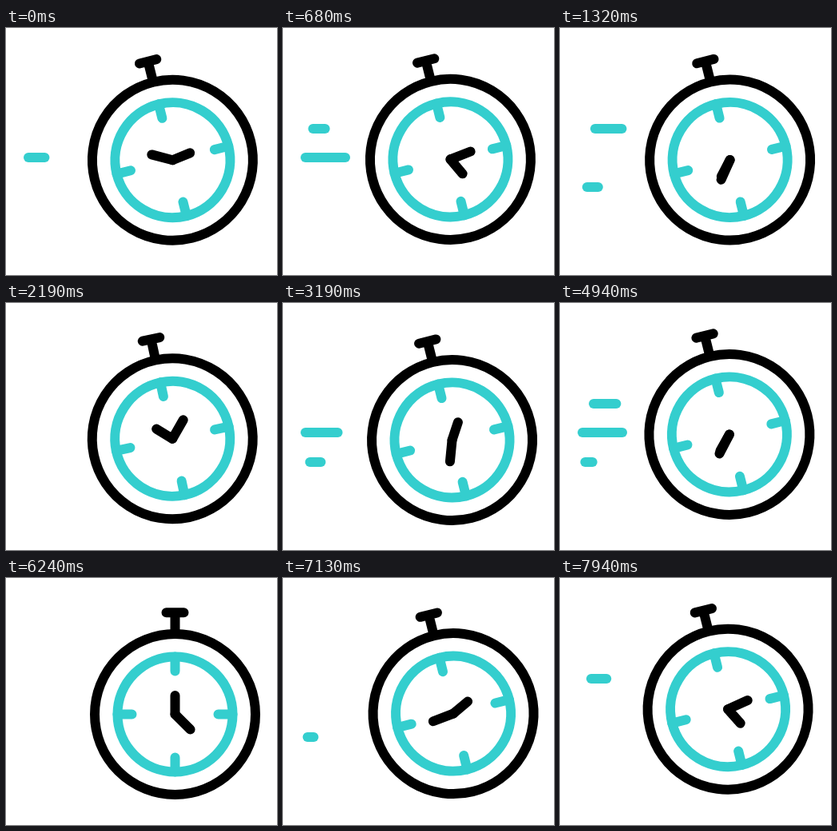
These frames come from a looping animation (339 by 309 pixels, 8 s). An HTML page:

```html
<!DOCTYPE html>
<html lang="en">
<head>
<meta charset="utf-8">
<title>Stopwatch</title>
<style>
  html, body { margin: 0; width: 100%; height: 100%; overflow: hidden; background: #fff; }
  svg { display: block; width: 100vw; height: 100vh; }
  svg * { fill: none; stroke-width: 12; stroke-linecap: round; stroke-linejoin: round; }
  .ink { stroke: #000; }
  .teal { stroke: #34cece; }
</style>
</head>
<body>
<svg viewBox="0 0 339 309">
  <g id="streaks"></g>
  <g id="watch">
    <path class="ink" d="M0-101V-127M-11-127.2H11"/>
    <circle class="ink" r="100.5"/>
    <circle class="teal" r="72"/>
    <path class="teal" d="M0-72V-54M0 72V54M-72 0H-54M72 0H54"/>
    <path class="ink" id="minute" d="M0 0V-23.5"/>
    <path class="ink" id="hour" d="M0 0V-27"/>
  </g>
</svg>
<script>
const LOOP = 8000, SPIN = 3300, LEAN = -14, WINDUP = 30;
const RUNS = [{ from: -772, pace: 0.97 }, { from: 2895, pace: 1 }, { from: 6544, pace: 1 }];

// Burst n of a row starts to fade at first + gap * n + drift * n * n.
const ROWS = [
  { y: 126, reach: 38, end: 22, lead: 50, grow: 50, first: 1015, gap: 338, drift: 0 },
  { y: 162, reach: 22, end: 22, lead: 27, grow: 12, first: 275, gap: 422, drift: -13 },
  { y: 199, reach: 38, end: 17, lead: 50, grow: 50, first: 228, gap: 252, drift: 19 }
];
const LEFT = 22, RIGHT = 84, FADE = 138, CAP = 6, LAST_BURST = 2370;

const byId = id => document.getElementById(id);
const clamp = v => Math.min(1, Math.max(0, v));
const mix = (a, b, u) => a + (b - a) * u;
const wave = turns => Math.sin(2 * Math.PI * turns);
const span = (v, from, to) => clamp((v - from) / (to - from));
const ramp = (v, from, to) => {
  const u = span(v, from, to);
  return u * u * (3 - 2 * u);
};

for (const row of ROWS) {
  row.el = document.createElementNS("http://www.w3.org/2000/svg", "path");
  row.el.setAttribute("class", "teal");
  byId("streaks").append(row.el);
}

function streakPath(row, p) {
  for (let n = 0; n < 8; n++) {
    const start = row.first + row.gap * n + row.drift * n * n;
    const age = p - start;
    if (start > LAST_BURST || age < -row.lead || age > FADE) continue;
    const u = clamp(age / FADE);
    const tail = mix(RIGHT, LEFT, u);
    const head = age < 0
      ? mix(RIGHT, row.reach, clamp((age + row.lead) / row.grow))
      : Math.max(LEFT, mix(row.reach, row.end, u));
    if (tail - head > 2 * CAP) return `M${head + CAP} ${row.y}H${tail - CAP}`;
  }
  return "";
}

function drawWatch(p) {
  // a hop with a swing, then a lean with a circular tremble, then upright again
  const hop = span(p, -WINDUP, 299);
  const rise = 18.5 * wave(hop) + 15 * Math.sin(Math.PI * hop) ** 2;
  const swing = 16 * wave(span(p, -WINDUP, 190));
  const lean = LEAN * (ramp(p, 40, 220) - ramp(p, 2750, 3290));
  const shake = ramp(p, 285, 420) - ramp(p, 2950, 3260);
  const angle = (744 - 1.055 * p) * Math.PI / 180;
  const x = 211.5 + shake * (3 * Math.sin(angle) - 0.9);
  const y = 170.5 - rise - shake * (3.5 * Math.cos(angle) + 2.9);
  const turn = clamp(p / SPIN);
  byId("watch").setAttribute("transform", `translate(${x} ${y}) rotate(${lean + swing})`);
  byId("minute").setAttribute("transform", `rotate(${360 * turn})`);
  byId("hour").setAttribute("transform", `rotate(${135 + 720 * turn})`);
}

function draw(time) {
  const run = RUNS.filter(r => time >= r.from - WINDUP).pop();
  const p = (time - run.from) * run.pace;
  drawWatch(p);
  for (const row of ROWS) row.el.setAttribute("d", streakPath(row, p));
}

const begin = performance.now();
function tick() {
  draw((performance.now() - begin) % LOOP);
  requestAnimationFrame(tick);
}
tick();
</script>
</body>
</html>
```
